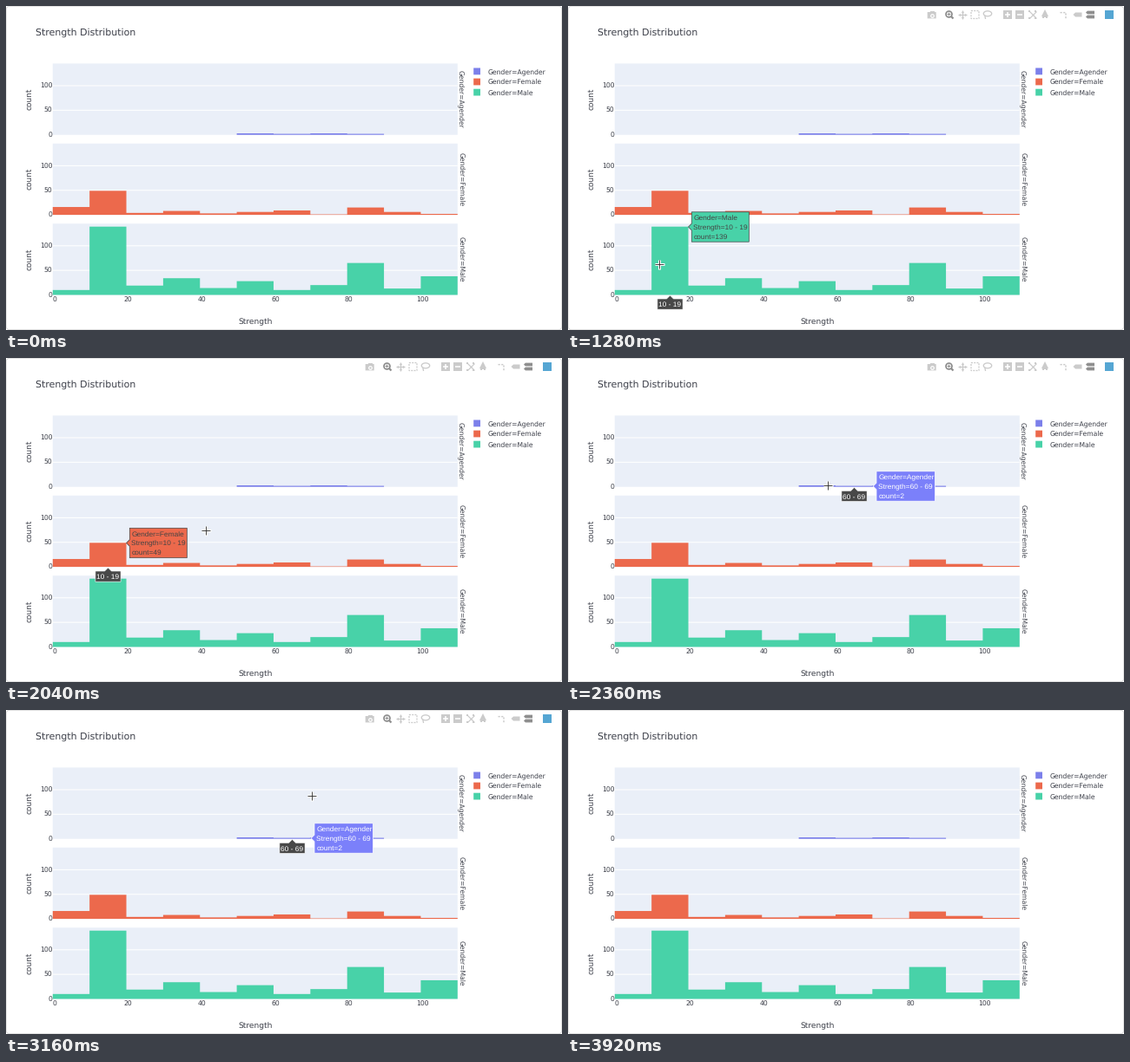
Write a matplotlib script that moves like this. It is 640x374 px and loops after 4120 ms.

```python
import numpy as np
import matplotlib.pyplot as plt
from matplotlib.animation import FuncAnimation
from matplotlib.patches import Ellipse, FancyBboxPatch, Polygon, Rectangle

W, H, DPI = 640, 374, 100
STEP, LOOP = 40, 4120
INK, PANEL, LABEL_INK = "#3c3f49", "#eaeff8", "#444444"
PURPLE, RED, GREEN = "#7c80ea", "#ec694c", "#48d2a8"
LIGHT, DARK = "#cbcbcb", "#8e8e8e"
LEFT, RIGHT, BINS = 53.8, 519.8, 11
UNIT = 0.567  # pixels per count
ROW = 92.4    # distance between panels

plt.rcParams["text.hinting"] = "none"
fig = plt.figure(figsize=(W / DPI, H / DPI), dpi=DPI, facecolor="white")
ax = fig.add_axes([0, 0, 1, 1])
ax.set_xlim(0, W)
ax.set_ylim(H, 0)
ax.axis("off")


def pt(px):
    return px * 72 / DPI


def text(x, y, s, px=7.6, color=INK, font="DejaVu Sans", z=3, **kw):
    kw.setdefault("va", "baseline")
    return ax.text(x, y, s, fontsize=pt(px), color=color, family=font,
                   zorder=z, **kw)


def add(patch, z):
    patch.set_zorder(z)
    patch.set_snap(False)
    return ax.add_patch(patch)


def rect(x, y, w, h, color, z=1):
    return add(Rectangle((x, y), w, h, fc=color, lw=0), z)


def poly(points, color, z, edge="none", px=0):
    return add(Polygon(points, closed=True, fc=color, ec=edge, lw=pt(px),
                       joinstyle="miter"), z)


def line(xs, ys, color, px, z=1, **kw):
    return ax.plot(xs, ys, color=color, lw=pt(px), zorder=z, snap=False,
                   solid_capstyle="butt", **kw)[0]


def mark(x, y, shape, size, color, z=4, px=0, fill=True):
    return ax.plot(x, y, shape, ms=pt(size), mec=color, mew=pt(px), zorder=z,
                   mfc=color if fill else "none", snap=False)[0]


def balloon(tip, notch, half, depth):
    """Outline of a box whose pointer starts at the tip and aims along x."""
    side = np.array([(0, 0), (notch, notch), (notch, half), (depth, half)])
    return np.vstack([side, side[:0:-1] * (1, -1)]) + tip


def draw_chart():
    add(FancyBboxPatch((0.3, 0.3), W - 0.6, H - 0.6, fc="none", ec="#d6d6d6",
                       lw=pt(0.8), boxstyle="round,pad=0,rounding_size=4"), 1)
    bins = np.arange(BINS)
    groups = [
        ("Agender", PURPLE, np.where(abs(bins - 6.5) < 2, 2 + bins % 2, 0)),
        ("Female", RED, [16, 49, 4, 8, 3, 6, 9, 1, 15, 6, 2]),
        ("Male", GREEN, [10, 139, 19, 34, 14, 28, 10, 20, 65, 13, 38]),
    ]
    edges = np.linspace(LEFT, RIGHT, BINS + 1)
    for i, (name, color, counts) in enumerate(groups):
        base = 148.7 + ROW * i
        rect(LEFT, base - 82.3, RIGHT - LEFT, 82.3, PANEL)
        for v in (0, 50, 100):
            y = base - v * UNIT
            if v:
                line([LEFT, RIGHT], [y, y], "white", 1.1, 2)
            text(53.6, y + 3, str(v), ha="right")
        ax.stairs(base - UNIT * np.array(counts), edges, baseline=base,
                  fill=True, color=color, lw=0, zorder=2.5, snap=False)

        mid = base - 41.5
        text(27.3, mid, "count", 9, rotation=90, ha="center", va="center")
        text(523.6, mid, "Gender=" + name, rotation=270, ha="center",
             va="center")
        key = 75.4 + 12.1 * i
        rect(538.2, key - 3.9, 7.8, 7.8, color)
        text(555, key + 2.8, "Gender=" + name)

    scale = (RIGHT - LEFT) / (10 * BINS)
    for v in range(0, 101, 20):
        text(LEFT + (v + 0.5) * scale, 341.9, str(v), ha="center")
    text(34, 34, "Strength Distribution", 11)
    text(287, 367, "Strength", 9.1, ha="center")


# Toolbar icons, each drawn around its centre x
BAR_Y = 10


def camera(x):
    return [rect(x - 5, BAR_Y - 3, 10, 7.4, LIGHT, 4),
            mark(x, BAR_Y - 2, "s", 5, LIGHT),
            mark(x, BAR_Y + 0.5, "o", 3.6, "white", 4.1, 1.2, False)]


def magnifier(x):
    return [mark(x - 1.5, BAR_Y - 1, "o", 7, DARK, px=1.7, fill=False),
            mark(x - 1.5, BAR_Y - 1, "+", 3.6, DARK, px=1),
            line([x + 1, x + 4], [BAR_Y + 1.5, BAR_Y + 4.5], DARK, 2.2, 4)]


def pan(x):
    ends = zip("><v^", (1, -1, 0, 0), (0, 0, 1, -1))
    return [mark(x, BAR_Y, "+", 8, LIGHT, px=1.3)] + [
        mark(x + 4 * dx, BAR_Y + 4 * dy, s, 3.2, LIGHT) for s, dx, dy in ends]


def box_select(x):
    return [add(Rectangle((x - 4.5, BAR_Y - 4.5), 9, 9, fc="none", ec=LIGHT,
                          lw=pt(1.3), ls=(0, (1.5, 1))), 4)]


def lasso(x):
    return [add(Ellipse((x, BAR_Y - 1.2), 9.4, 6, fc="none", ec=LIGHT,
                        lw=pt(1.3)), 4),
            line([x - 3.2, x - 2.4], [BAR_Y + 1, BAR_Y + 5], LIGHT, 1.3, 4)]


def zoom_by(sign):
    return lambda x: [mark(x, BAR_Y, "s", 9.2, LIGHT),
                      mark(x, BAR_Y, sign, 5.6, "white", 4.1, 1.5)]


def autoscale(x):
    corners = [(s, t) for s in (-1, 1) for t in (-1, 1)]
    return [mark(x, BAR_Y, "x", 7.5, LIGHT, px=1.2)] + [
        mark(x + 3.6 * s, BAR_Y + 3.6 * t, "s", 2.4, LIGHT)
        for s, t in corners]


def home(x):
    return [mark(x, BAR_Y - 2, "^", 8.5, LIGHT),
            mark([x - 2.3, x + 2.3], [BAR_Y + 3, BAR_Y + 3], "s", 2.8, LIGHT),
            mark(x, BAR_Y + 1.2, "s", 4, LIGHT)]


def spikes(x):
    return [line([x - 5.5, x + 1, x + 1], [BAR_Y - 2.4, BAR_Y - 2.4, BAR_Y + 5],
                 LIGHT, 1.4, 4, dashes=(1.6, 1))]


def tags(color, half, offsets):
    return lambda x: [poly(balloon((x - 5, BAR_Y + d), half, half, 10), color, 4)
                      for d in offsets]


def badge(x):
    return [mark(x, BAR_Y, "s", 10, "#55a6d3")]


TOOLS = [
    (418.7, [camera]),
    (439.5, [magnifier, pan, box_select, lasso]),
    (505.5, [zoom_by("+"), zoom_by("_"), autoscale, home]),
    (572, [spikes, tags(LIGHT, 2.5, [0]), tags(DARK, 1.9, [-2.5, 2.5])]),
    (623, [badge]),
]


def draw_toolbar():
    return [part for start, icons in TOOLS for k, icon in enumerate(icons)
            for part in icon(start + 14.5 * k)]


def hover(name, color, ink, tip, bin_label, count, foot, width=69.8):
    """Hover label beside a bar, with its bin label below."""
    x, y = tip
    parts = [poly(balloon(tip, 3.8, 17.2, width), color, 5, ink, 0.7)]
    rows = ["Gender=" + name, "Strength=" + bin_label, f"count={count}"]
    for k, s in enumerate(rows):
        parts.append(text(x + 6, y + 3 + 10.7 * (k - 1), s, 8.35, ink,
                          "Liberation Sans", 6))
    u, v = foot
    below = balloon((v, u), 4, 14.6, 16.2)[:, ::-1]
    parts.append(poly(below, "#484848", 5, "white", 0.6))
    parts.append(text(u, v + 13.2, bin_label, 8.35, "white", "Liberation Sans",
                      6, ha="center"))
    return parts


draw_chart()
toolbar = draw_toolbar()
hovers = [  # start, end, artists
    (1200, 1640, hover("Male", GREEN, LABEL_INK, (138.5, 255), "10 - 19", 139,
                       (117.5, 334))),
    (1640, 2280, hover("Female", RED, LABEL_INK, (138.5, 213.5), "10 - 19", 49,
                       (117.5, 242))),
    (2280, 3280, hover("Agender", "#7b80fa", "white", (351.2, 148), "60 - 69",
                       2, (329.5, 149.3), 71.3)),
]

# Pointer: an arrow outside the chart, a haloed cross once it is active
ARROW = np.array([(0, 0), (0, 10.2), (2.4, 8), (4, 11.8), (5.8, 11), (4.2, 7.3),
                  (7.4, 7.3)])
arrow = poly(ARROW, "black", 8, "white", 0.8)
cross = [mark(0, 0, "+", 11, "white", 7, 3),
         mark(0, 0, "+", 9.4, "#333333", 8, 0.9)]

ENTER, ACTIVE, LEAVE, GONE = 480, 1160, 3240, 3360
route = np.array([  # time, x, y
    (ENTER, 150, 352), (640, 101, 299), (ACTIVE, 102, 299), (1280, 105, 298),
    (1680, 124, 222), (2040, 230, 199), (2360, 299, 147), (2760, 328, 144),
    (3160, 352, 99), (GONE, 637, 0),
]).T


def update(i):
    t = i * STEP
    x, y = (np.interp(t, route[0], axis) for axis in route[1:])
    shown = ENTER <= t < GONE
    active = ACTIVE <= t < LEAVE

    arrow.set_visible(shown and not active)
    arrow.set_xy(ARROW + (x, y))
    for part in cross:
        part.set_visible(shown and active)
        part.set_data([x], [y])

    alpha = float(np.interp(t, [1120, 1280, 3400, 3680], [0, 1, 1, 0]))
    for part in toolbar:
        part.set_alpha(alpha)
        part.set_visible(alpha > 0)
    for start, end, parts in hovers:
        for part in parts:
            part.set_visible(start <= t < end)
    return []


anim = FuncAnimation(fig, update, frames=LOOP // STEP, interval=STEP,
                     init_func=lambda: update(0), repeat=True, repeat_delay=0)
plt.show()
```
